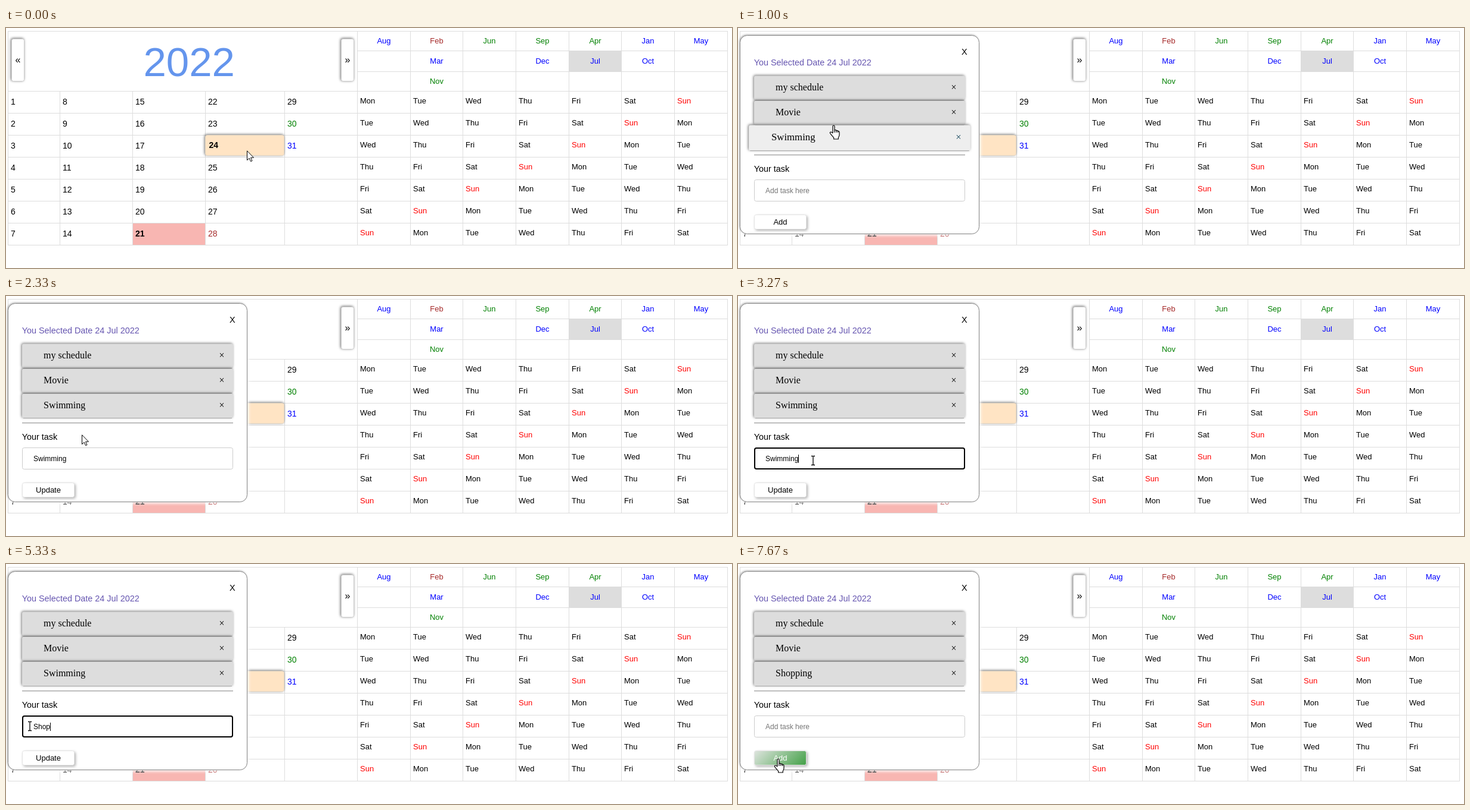
Write an HTML page that moves like this. It is 1218 px wide and 404 px high and loops after 9.19 s.

```html
<!DOCTYPE html>
<html lang="en">
<head>
<meta charset="utf-8">
<title>Calendar tasks</title>
<style>
  html, body { margin: 0; width: 100%; height: 100%; overflow: hidden; background: #fff; }
  svg { display: block; width: 1218px; height: 404px; }
  text { font: 13px "Liberation Sans", Arial, sans-serif; white-space: pre; }
  .day { font-size: 14px; }
  .bold { font-weight: bold; }
  .year { font-size: 69px; fill: cornflowerblue; }
  .label { font-size: 14.4px; }
  .field { font-size: 12px; }
  .task { font: 16px "Liberation Serif", "Times New Roman", serif; }
  .mid { text-anchor: middle; }
  .raised { filter: drop-shadow(-1px -1px 2px rgba(0, 0, 0, .55)); }
  .panel { filter: drop-shadow(-1px -1px 1.5px rgba(0, 0, 0, .3)) drop-shadow(2px 2px 2.5px #fff); }
  .button { filter: drop-shadow(2px 2px 2px rgba(0, 0, 0, .3)); }
</style>
</head>
<body>
<svg id="stage" viewBox="0 0 1218 404">
  <defs>
    <clipPath id="clip"><rect id="clipBox" x="0" y="8" width="412" height="338"/></clipPath>
    <linearGradient id="green" gradientUnits="userSpaceOnUse" x1="43" y1="298" x2="99" y2="354">
      <stop offset="0" stop-color="#e0e5e0"/><stop offset="1" stop-color="#43a047"/>
    </linearGradient>
  </defs>
</svg>
<script>
const LOOP = 9190, FRAME = 1000 / 15;
const stage = document.getElementById('stage');
const clipBox = document.getElementById('clipBox');

function el(tag, attrs, parent = stage) {
  const node = document.createElementNS('http://www.w3.org/2000/svg', tag);
  set(node, attrs);
  parent.append(node);
  return node;
}
function set(node, attrs) {
  for (const key in attrs) node.setAttribute(key, attrs[key]);
}
function text(x, y, str, cls = '', fill = '#000', parent = stage) {
  const node = el('text', { x, y, class: cls, fill }, parent);
  node.textContent = str;
  return node;
}
function box(x, y, width, height, attrs, parent = stage) {
  return el('rect', { x, y, width, height, ...attrs }, parent);
}
const show = (node, on) => node.setAttribute('visibility', on ? 'visible' : 'hidden');

// Calendar grid
const leftX = [3, 90, 212, 334, 467, 589];
const rightX = [589, 678, 766, 855, 944, 1032, 1121, 1210];
const monthY = [5, 38, 73, 106];
const rowY = Array.from({ length: 8 }, (_, i) => 106 + 37 * i);

box(945, 39, 87, 34, { fill: '#ddd' });
box(213, 329, 121, 36, { fill: '#f8b6b2' });
const hLine = (x, y, w) => box(x, y, w, 1, { fill: '#ddd' });
const vLine = (x, y, h) => box(x, y, 1, h, { fill: '#ddd' });
monthY.forEach(y => hLine(589, y, 622));
hLine(3, 5, 586);
rowY.forEach(y => hLine(3, y, 1208));
leftX.forEach((x, i) => i % 5 ? vLine(x, 106, 260) : vLine(x, 5, 361));
rightX.forEach(x => vLine(x, 5, 361));

const months = [
  ['Aug'], ['Feb', 'Mar', 'Nov'], ['Jun'], ['Sep', 'Dec'], ['Apr', 'Jul'], ['Jan', 'Oct'], ['May']
];
const monthColor = m => m === 'Feb' ? 'brown' : /Jun|Sep|Apr|Nov/.test(m) ? 'green' : 'blue';
months.forEach((list, c) => list.forEach((m, r) =>
  text((rightX[c] + rightX[c + 1]) / 2 + .5, 26 + 34 * r, m, 'mid', monthColor(m))));

const week = ['Mon', 'Tue', 'Wed', 'Thu', 'Fri', 'Sat', 'Sun'];
for (let r = 0; r < 7; r++) for (let c = 0; c < 7; c++) {
  const name = week[(r + c) % 7];
  text(rightX[c] + 5, 127 + 37 * r, name, '', name === 'Sun' ? 'red' : '#000');
}

box(334.5, 180.5, 132, 34, { rx: 3, fill: 'bisque', stroke: '#e4d5c0', class: 'raised' });
const dayColor = { 28: 'brown', 30: 'green', 31: 'blue' };
for (let d = 1; d <= 31; d++) {
  const c = Math.floor((d - 1) / 7), r = (d - 1) % 7, hot = d === 24;
  text(leftX[c] + (hot ? 6.5 : 5), 129 + 37 * r + (hot ? -1 : 0), d,
    d === 21 || hot ? 'day bold' : 'day', dayColor[d]);
}

text(230.5, 81, '2022', 'year', 'cornflowerblue');
[[9, '«'], [562, '»']].forEach(([x, sign]) => {
  box(x + .5, 18.5, 21, 71, { rx: 3, fill: '#fff', stroke: '#ccc', class: 'raised' });
  text(x + 11, 59, sign, 'mid').style.fontSize = '16px';
});

// Task panel
const panel = el('g', {});
const frame = box(3.5, 12.5, 401, 334, { rx: 12, fill: '#fff', stroke: '#888', class: 'panel' }, panel);
const body = el('g', { 'clip-path': 'url(#clip)' }, panel);
text(375, 45, 'X', 'label', '#000', body);
text(26.7, 63, 'You Selected Date 24 Jul 2022', 'label', '#6555b0', body);

const tasks = ['my schedule', 'Movie', 'Swimming'].map((name, i) => {
  const y = 80 + 42 * i;
  const g = el('g', {}, body);
  const back = box(27, y + .5, 354, 41, { rx: 3, fill: '#ddd', class: 'raised' }, g);
  box(29, y + 41, 350, 1, { fill: '#aaa' }, g);
  const label = text(63, y + 25, name, 'task', '#000', g);
  const cross = text(357.5, y + 25, '×', 'task', '#000', g);
  return { g, back, label, cross, cy: y + 21 };
});

box(27, 213, 354, 1, { fill: '#999' }, body);
box(27, 214, 354, 1, { fill: '#e6e6e6' }, body);
text(26.7, 242, 'Your task', 'label', '#000', body);
const input = box(27.5, 255.5, 353, 36, { rx: 3, fill: '#fff', stroke: '#ccc' }, body);
const ring = box(28, 256, 352, 35, { rx: 3, fill: 'none', stroke: '#000', 'stroke-width': 2 }, body);
const mark = box(46, 267, 0, 14, { fill: '#0078d7' }, body);
const field = text(46, 278, '', 'field', '#000', body);
const marked = el('tspan', {}, field);
const caret = box(0, 267, 1, 14, { fill: '#000' }, body);

const button = box(27.5, 314.5, 87, 24, { rx: 3, stroke: '#e4e4e4', class: 'button' }, body);
const buttonText = text(71, 331, '', 'mid', '#000', body);

// Pointers, each with its hot spot at 0,0
const shape = { fill: '#fff', stroke: '#000', 'stroke-width': 1, 'stroke-linejoin': 'round' };
const pointers = {
  arrow: el('path', { ...shape, d: 'M.5 .8V16.5L4.2 13.2 6.6 18.6 9 17.6 6.6 12.2H11.5Z' }),
  hand: el('path', { ...shape, 'stroke-width': 1.2,
    d: 'M-1 13V1.5a1.5 1.5 0 0 1 3 0V8q2.7-1 2.9.8 2.5-.8 2.7 1 2.4-.5 2.4 1.7v4.5q0 2-1.7 4.5v2.5H.7v-2.3Q-2.5 17-5.3 13.3q-1-2 .9-2.3 1.4 0 3.4 2.2M2 8v4M4.9 9v3M7.6 10v2' }),
  beam: el('path', { fill: 'none', stroke: '#000', 'stroke-width': 1.3,
    d: 'M-3-7.5h2L0-6.8 1-7.5H3M0-6.8V6.8M-3 7.5h2L0 6.8 1 7.5H3' })
};

// Pointer path: time, x, y
const path = [
  [0, 404, 206], [66, 404, 206], [66, 400, 204], [267, 400, 204], [467, 398, 204], [560, 398, 204],
  [800, 250, 176], [1000, 160, 164], [1133, 152, 164], [1267, 142, 150], [1400, 130, 166],
  [1600, 126, 181], [2100, 126, 181], [2467, 128, 262], [2600, 127, 291], [2733, 126, 285],
  [3050, 126, 285], [3200, 126, 277], [3270, 126, 277], [3667, 49, 275], [3990, 49, 275],
  [3990, 40, 273], [6560, 40, 273], [7000, 52, 300], [7467, 67, 328]
];
function pointerAt(t) {
  const i = path.findIndex(k => k[0] > t);
  if (i < 0) return path[path.length - 1].slice(1);
  const [t0, x0, y0] = path[i - 1], [t1, x1, y1] = path[i];
  const p = (t - t0) / (t1 - t0);
  return [x0 + (x1 - x0) * p, y0 + (y1 - y0) * p];
}

const OPEN = 218, PICKED = 1930, FOCUS = 3200, DRAG = 3270, BLUR = 7530, SAVED = 7600;
const keyTimes = [4600, 4930, 5130, 5330, 5470, 5670, 5870, 6070];

function fieldValue(t) {
  if (t < PICKED || t >= SAVED) return '';
  const typed = keyTimes.filter(k => t >= k).length;
  return typed ? 'Shopping'.slice(0, typed) : 'Swimming';
}

function draw(now) {
  const time = now % LOOP + 4;
  const t = Math.floor(time / FRAME) * FRAME + 4;
  const [x, y] = pointerAt(t);

  // Panel opening
  const k = Math.min(1, Math.max(0, (t - OPEN) / 400));
  const open = .5 - Math.cos(Math.PI * k) / 2;
  show(panel, open > 0);
  set(panel, { opacity: open });
  set(frame, { height: 334 * open });
  set(clipBox, { height: 4 + 334 * open });

  // Hover
  const inside = open > .5 && x > 27 && x < 381;
  const over = inside && y >= 80 && y < 206 ? Math.floor((y - 80) / 42) : -1;
  const onInput = inside && y >= 255 && y < 292;
  const onButton = inside && x < 115 && y >= 314 && y < 339;
  tasks.forEach(({ g, back, cross, cy }, i) => {
    const hot = i === over;
    set(g, { transform: hot ? `translate(204 ${cy}) scale(1.05) translate(-204 ${-cy})` : '' });
    set(back, { fill: hot ? '#eee' : '#ddd' });
    set(cross, { fill: hot ? '#14465a' : '#000' });
  });
  tasks[2].label.textContent = t >= SAVED ? 'Shopping' : 'Swimming';

  // Field
  const value = fieldValue(t), focus = t >= FOCUS && t < BLUR;
  const dragging = t >= DRAG && t < keyTimes[0];
  const from = dragging ? Math.max(0, Math.min(8, Math.round((x - 46) / 55 * 8))) : value.length;
  field.firstChild.nodeType === 3 && field.firstChild.remove();
  field.prepend(value ? value.slice(0, from) : 'Add task here');
  marked.textContent = value.slice(from);
  set(field, { fill: value ? '#000' : '#757575' });
  set(marked, { fill: '#fff' });
  const total = value ? field.getComputedTextLength() : 0;
  const start = from && value ? field.getSubStringLength(0, from) : 0;
  set(mark, { x: 46 + start, width: Math.max(0, total - start) });
  show(mark, focus && from < value.length);
  set(caret, { x: Math.round(46 + start) });
  show(caret, focus && from === value.length);
  show(ring, focus);
  show(input, true);

  // Button
  set(button, { fill: onButton ? 'url(#green)' : '#fff' });
  buttonText.textContent = t >= PICKED && t < SAVED ? 'Update' : 'Add';
  set(buttonText, { fill: onButton ? '#fff' : '#000' });

  // Pointer
  const kind = over >= 0 || onButton ? 'hand' : onInput ? 'beam' : 'arrow';
  for (const name in pointers) show(pointers[name], name === kind);
  set(pointers[kind], { transform: `translate(${Math.round(x)} ${Math.round(y)})` });
  if (!open) show(panel, false);
}

[panel, input].forEach(node => show(node, true));
const began = performance.now();
(function tick() {
  draw(performance.now() - began);
  requestAnimationFrame(tick);
})();
</script>
</body>
</html>
```
